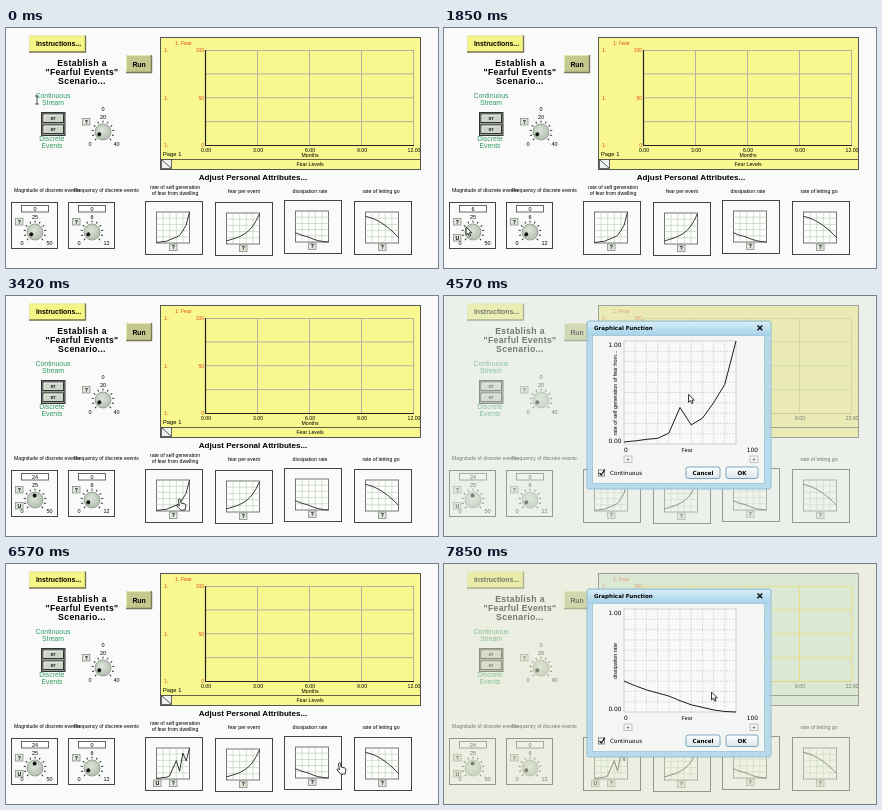
An HTML page for the animation above (7.99 s loop, 432 px wide and 240 px high).

```html
<!DOCTYPE html>
<html lang="en">
<head>
<meta charset="utf-8">
<title>Fearful Events</title>
<style>
html, body { margin: 0; width: 100%; height: 100%; overflow: hidden; background: #fafafa; }
svg { display: block; width: 100vw; height: 100vh; }
text { font-family: "Liberation Sans", Arial, sans-serif; white-space: pre; }
.b { font-weight: bold; }
.h { font-weight: bold; letter-spacing: .35px; }
.v { font-family: "DejaVu Sans", Verdana, sans-serif; }
</style>
</head>
<body>
<svg id="stage" viewBox="0 0 432 240" preserveAspectRatio="none"></svg>
<script>
const LOOP = 7990, STEP = 142.7;
const PAPER = '#fafafa', GREEN = '#2f9a62', RED = '#e04a24', YELLOW = '#f8f88e';

// markup helpers
const rect = (x, y, w, h, fill, stroke = 'none', more = '') =>
  `<rect x="${x}" y="${y}" width="${w}" height="${h}" fill="${fill}" stroke="${stroke}" ${more}/>`;
const path = (d, stroke, width = 1, more = '') =>
  `<path d="${d}" fill="none" stroke="${stroke}" stroke-width="${width}" ${more}/>`;
const text = (s, x, y, size, more = '', anchor = 'middle') =>
  `<text x="${x}" y="${y}" font-size="${size}" text-anchor="${anchor}" ${more}>${s}</text>`;

const bevel = (x, y, w, h, fill) =>
  rect(x, y, w, h, fill) +
  path(`M${x + .5} ${y + h}V${y + .5}H${x + w}`, '#e6e6b0') +
  path(`M${x} ${y + h - .5}H${x + w - .5}V${y}`, '#77775c', 1.4);

const key = (label, x, y, id = '') =>
  `<g ${id && `id="${id}"`}>` + rect(x + .5, y + .5, 7.5, 6.5, '#dfe6dc', '#8a8f88', 'stroke-width=".8"') +
  text(label, x + 4.3, y + 5.8, 5.2, 'class="b"') + '</g>';

function knob(cx, cy, id) {
  let ticks = '';
  for (let a = -135; a <= 135; a += 27)
    ticks += `<path d="M0 -9.4V-11.4" transform="rotate(${a})"/>`;
  return `<g transform="translate(${cx} ${cy})">
    <g stroke="#333" stroke-width="1">${ticks}</g>
    <circle r="8" fill="url(#metal)" stroke="#8b948a" stroke-width=".8"/>
    <g id="${id}" transform="rotate(-122)"><circle cy="-4.4" r="2" fill="#111"/></g></g>`;
}

function dial(x, mid, max, id) {
  const cx = x + 24;
  return rect(x + .5, 174.5, 46, 46, PAPER, '#444') +
    rect(x + 10.5, 177.5, 27, 6.5, '#fff', '#444', 'stroke-width=".8"') +
    text('0', cx, 182.8, 5.5, `id="${id}Val"`) +
    text(mid, cx, 191, 5.5) + text('0', x + 11, 217, 5.5) + text(max, x + 38.5, 217, 5.5) +
    key('?', x + 4, 190) + knob(cx, 204, id);
}

// values are fractions of the plot height, evenly spaced in x
const plot = (vals, x, y, w, h) =>
  'M' + vals.map((v, i) => `${(x + w * i / (vals.length - 1)).toFixed(2)} ${(y + h * (1 - v)).toFixed(2)}`).join('L');

function grid(x, y, w, h, n, m = n) {
  let d = '';
  for (let i = 1; i < n; i++) d += `M${x + w * i / n} ${y}v${h}`;
  for (let i = 1; i < m; i++) d += `M${x} ${y + h * i / m}h${w}`;
  return d;
}

const eleven = f => Array.from({ length: 11 }, (_, i) => f(i / 10));
const dwell = [.02, .03, .045, .055, .105, .145, .185, .25, .4, .58, 1];
const fade = [.3, .255, .215, .185, .155, .11, .07, .045, .02, .005, 0];

function panel(x, y, vals, id = '') {
  const gx = x + 11.5, gy = y + 11;
  return rect(x + .5, y + .5, 57, 53, PAPER, '#444') +
    rect(gx, gy, 33, 31, '#fff', '#666', 'stroke-width=".9"') +
    path(grid(gx, gy, 33, 31, 5), '#bdd2b8', .7) +
    path(plot(vals, gx, gy, 33, 31), '#222', .9, id && `id="${id}"`) +
    key('?', x + 24, y + 42.5);
}

function chart() {
  let s = rect(154.5, 9.5, 260, 132, YELLOW, '#555', 'id="sheet"');
  s += path(grid(199.5, 22, 208, 95.5, 4) + 'M199.5 22.5H407.5V117', '#b2b2a6', 1, 'id="lines"');
  s += path('M199.5 22V117.5H408', '#222', 1.2, 'id="axes"');
  s += path('M155 131.5H414', '#55553c', .9);
  s += text('1: Fear', 169, 16.5, 5.3, `fill="${RED}"`, 'start');
  for (const y of [24, 71.5, 119]) s += text('1:', 158, y, 5, `fill="${RED}"`, 'start');
  s += text('100', 198, 24, 5, `fill="${RED}"`, 'end') + text('50', 198, 71.5, 5, `fill="${RED}"`, 'end') +
    text('0', 198, 119, 5, `fill="${RED}"`, 'end');
  ['0.00', '3.00', '6.00', '9.00', '12.00'].forEach((l, i) => s += text(l, 200 + i * 52, 123.5, 5.2));
  s += text('Months', 304, 128.7, 5.2) + text('Fear Levels', 304, 137.5, 5.2) + text('Page 1', 157, 128, 5.8, '', 'start');
  return s + rect(155.5, 131.5, 10, 9, '#eef2f0', '#444', 'stroke-width=".8"') + path('M156 132L165 140', '#333', .8);
}

const onOff = y => rect(37, y, 20.5, 8.5, '#ccd4c8', '#333') +
  path(`M38 ${y + 7.5}V${y + 1}H57`, '#f4f8f2', .8) + text('ST', 47, y + 5.8, 4, 'class="b"');

const button = (label, x, w) =>
  rect(x, 171, w, 11.5, 'url(#face)', '#6f9cb8', 'rx="2" stroke-width=".9"') +
  text(label, x + w / 2, 179, 5.6, 'class="v b"');

const tiny = x => rect(x, 160, 8, 6.5, '#f3f5f3', '#aaa', 'stroke-width=".7"') + text('+', x + 4, 165, 5);

const dialog = () => `<g id="dialog">` +
  rect(143, 25, 184, 168, '#b3d9ee', '#8fb9d0', 'rx="2" opacity=".9"') +
  rect(144, 26, 182, 14, 'url(#bar)') +
  rect(148.5, 39.5, 172, 148, '#f4f6f3', '#9fc2d4', 'stroke-width=".8"') +
  text('Graphical Function', 150, 34, 5.55, 'class="v b"', 'start') +
  path('M313.5 29.5L318.3 34.3M318.3 29.5L313.5 34.3', '#111', 1.5) +
  rect(180, 45, 112, 103, '#f8f9f8', '#c4c8cc', 'stroke-width=".8"') +
  path(grid(180, 45, 112, 103, 10), '#c9cfdd', .7, 'stroke-dasharray="2 1"') +
  path('', '#1a1a1a', 1, 'id="curve"') +
  text('1.00', 177.5, 51, 5.9, 'class="v"', 'end') + text('0.00', 177.5, 146.5, 5.9, 'class="v"', 'end') +
  text('0', 180, 156, 5.9, 'class="v"', 'start') + text('100', 314, 156, 5.9, 'class="v"', 'end') +
  text('Fear', 243, 156, 5.3) +
  `<text id="label" transform="translate(172.5 97) rotate(-90)" font-size="5.35" text-anchor="middle"></text>` +
  tiny(180) + tiny(306) +
  rect(154.5, 174, 6, 6, '#fff', '#666', 'stroke-width=".8"') + path('M155.5 176.8L157.3 179L160.8 173.6', '#111', 1.2) +
  text('Continuous', 166, 179, 5.7, 'class="v"', 'start') +
  button('Cancel', 242, 34) + button('OK', 282, 32) + '</g>';

const cursors = `<g id="cursor" stroke-linejoin="round">
  <path id="ibeam" d="M-2 -4H2M0 -4V4M-2 4H2" fill="none" stroke="#444" stroke-width=".9"/>
  <path id="arrow" d="M0 0V8L1.9 6.3L3.2 9.2L4.6 8.6L3.3 5.8H5.8Z" fill="#fff" stroke="#222" stroke-width=".9"/>
  <path id="hand" d="M0 0Q1.2 -.6 1.5 .6L2 4L6 5Q7.2 5.5 6.8 7L6 11H1.6L-2.2 6.8Q-2 5.4 -.5 6.2L.4 6.8L-.7 .8Z" fill="#fff" stroke="#222" stroke-width=".9"/></g>`;

const stage = document.getElementById('stage');
stage.innerHTML = `<defs>
  <radialGradient id="metal" cx=".45" cy=".4"><stop stop-color="#dde5da"/><stop offset="1" stop-color="#b9c4b6"/></radialGradient>
  <linearGradient id="bar" x2="0" y2="1"><stop stop-color="#d6edf8"/><stop offset="1" stop-color="#a4d0e8"/></linearGradient>
  <linearGradient id="face" x2="0" y2="1"><stop stop-color="#fff"/><stop offset="1" stop-color="#dbe5e9"/></linearGradient>
  </defs>` +
  rect(0, 0, 432, 240, PAPER) +
  bevel(23, 7.5, 57, 17, '#f6f684') + text('Instructions...', 52.5, 18, 6.9, 'class="b"') +
  bevel(120, 27, 26, 18, '#c3c98c') + text('Run', 133, 38.5, 6.8, 'class="b"') +
  text('Establish a', 76, 38, 8.7, 'class="h"') + text('"Fearful Events"', 76, 47, 8.6, 'class="h"') +
  text('Scenario...', 76, 55.5, 8.7, 'class="h"') +
  text('Continuous', 47, 70, 6.9, `fill="${GREEN}"`) + text('Stream', 47, 76.5, 6.9, `fill="${GREEN}"`) +
  text('Discrete', 46, 113, 6.9, `fill="${GREEN}"`) + text('Events', 46, 120, 6.9, `fill="${GREEN}"`) +
  rect(35.5, 84.5, 23.5, 23, '#9a9c98', '#333') + onOff(86) + onOff(97) +
  text('0', 97, 82.5, 5.5) + text('20', 97, 91, 5.5) + text('0', 84, 118, 5.5) + text('40', 110.5, 118, 5.5) +
  key('?', 76, 90) + knob(97, 104, 'stream') +
  chart() +
  text('Adjust Personal Attributes...', 247, 152, 8.1, 'class="b"') +
  text('Magnitude of discrete events', 8, 164, 5.15, '', 'start') +
  text('Frequency of discrete events', 68, 164, 5.05, '', 'start') +
  dial(5, 25, 50, 'mag') + key('U', 9, 206, 'magUndo') + dial(62, 6, 12, 'freq') +
  text('rate of self generation', 169, 161, 5.2) + text('of fear from dwelling', 169, 167, 5.2) +
  text('fear per event', 238, 165, 5.2) + text('dissipation rate', 304, 165, 5.2) + text('rate of letting go', 375, 165, 5.2) +
  panel(139, 173, dwell, 'dwell') + key('U', 147, 215.5, 'dwellUndo') +
  panel(209, 174, eleven(x => .1 + .32 * x + .56 * x ** 4)) +
  panel(278, 172, fade) +
  panel(348, 173, eleven(x => .86 - .22 * x - .46 * x * x)) +
  rect(0, 0, 432, 240, '#dfe9dd', 'none', 'id="veil"') + dialog() + cursors;

const el = {};
for (const n of stage.querySelectorAll('[id]')) el[n.id] = n;
const set = (id, name, v) => el[id].setAttribute(name, v);
const show = (id, on) => set(id, 'visibility', on ? 'visible' : 'hidden');
const clamp = x => Math.max(0, Math.min(1, x));
const ramp = (t, a, b, from, to) => from + (to - from) * clamp((t - a) / (b - a));

// pointer route: time, x, y, shape
const route = [
  [0, 31, 72, 'ibeam'], [280, 33, 84, 'arrow'], [1000, 24, 203, 'arrow'], [1420, 23, 207, 'arrow'],
  [1850, 22, 199, 'arrow'], [2280, 29, 197, 'arrow'], [2500, 33, 197, 'arrow'], [3270, 173, 203, 'hand'],
  [3560, 173, 203, 'arrow'], [3990, 236, 133, 'arrow'], [4420, 236, 111, 'arrow'], [4565, 244.5, 98, 'arrow'],
  [4700, 247, 129, 'arrow'], [5000, 247, 87, 'arrow'], [5130, 269, 107, 'arrow'], [5360, 269, 62, 'arrow'],
  [5560, 280.5, 130, 'arrow'], [5840, 297, 176, 'arrow'], [5985, 299, 178, 'arrow'], [6270, 316, 196, 'hand'],
  [6560, 333.5, 199, 'hand'], [6840, 306, 202, 'hand'], [6980, 306, 202, 'arrow'], [7840, 267.5, 128, 'arrow']
];

function pointer(t) {
  let i = route.length - 1;
  while (route[i][0] > t) i--;
  const [ta, xa, ya, shape] = route[i], [tb, xb, yb] = route[i + 1] || route[i];
  const x = tb > ta ? ramp(t, ta, tb, xa, xb) : xa, y = tb > ta ? ramp(t, ta, tb, ya, yb) : ya;
  set('cursor', 'transform', `translate(${x.toFixed(2)} ${y.toFixed(2)})`);
  for (const s of ['ibeam', 'arrow', 'hand']) show(s, s === shape);
}

function draw(t) {
  const first = t >= 3560 && t < 5985, second = t >= 6980, open = first || second;

  const mag = Math.round(t < 1850 ? ramp(t, 1420, 1840, 0, 6) : ramp(t, 1850, 2280, 6, 24));
  el.magVal.textContent = mag;
  set('mag', 'transform', `rotate(${mag / 50 * 244 - 122})`);
  show('magUndo', mag > 0);

  const vals = dwell.slice();
  vals[5] = ramp(t, 3990, 4420, dwell[5], .355);
  vals[6] = ramp(t, 4700, 5000, dwell[6], .59);
  vals[8] = ramp(t, 5130, 5360, dwell[8], .835);
  const done = t >= 5985;
  set('dwell', 'd', plot(done ? vals : dwell, 150.5, 184, 33, 31));
  show('dwellUndo', done);

  show('dialog', open);
  show('veil', open);
  if (open) {
    const start = first ? 3560 : 6980;
    set('veil', 'opacity', ramp(t, start - 140, start + 280, 0, .52).toFixed(3));
    set('veil', 'fill', second ? '#dee4ca' : t < 4700 ? '#dfe9dd' : '#e0e6d2');
    set('curve', 'd', plot(first ? vals : fade, 180, 45, 112, 103));
    el.label.textContent = first ? 'rate of self generation of fear from...' : 'dissipation rate';
  }
  set('sheet', 'fill', second ? '#d8f0e0' : first ? '#f5ee88' : YELLOW);
  set('lines', 'stroke', second ? '#f4d840' : first ? '#d0c478' : '#b2b2a6');
  set('axes', 'stroke', second ? '#f0c030' : first ? '#c8a850' : '#222');
  pointer(t);
}

const begin = performance.now();
function tick() {
  const t = (performance.now() - begin) % LOOP;
  draw(Math.floor((t + 5) / STEP) * STEP);
  requestAnimationFrame(tick);
}
tick();
</script>
</body>
</html>
```
